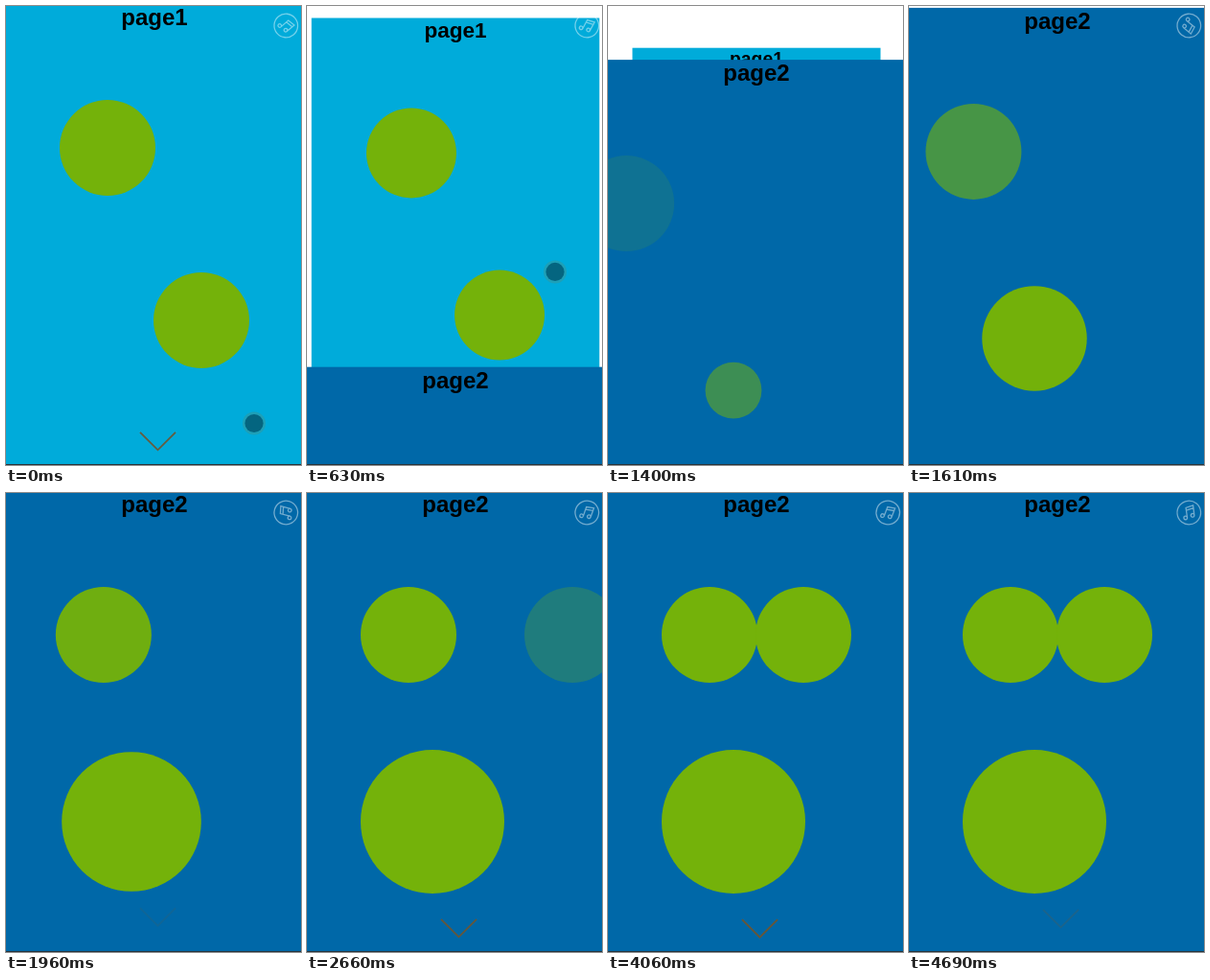
These frames come from a looping animation (308 by 479 pixels, 4760 ms). An HTML page with a canvas:

```html
<!DOCTYPE html>
<html lang="en">
<head>
<meta charset="utf-8">
<title>Page swipe</title>
<style>
  html, body { margin: 0; height: 100%; overflow: hidden; background: #fff; }
  canvas { display: block; }
</style>
</head>
<body>
<canvas id="stage" width="308" height="479"></canvas>
<script>
const ctx = document.getElementById('stage').getContext('2d');
const LOOP = 4760, STEP = 70;
const PAGE = { left: -5, top: -2, width: 320, height: 480, cx: 155, cy: 238 };
const GREEN = '#74b20a';
const DRAG_START = 100, RELEASE = 1100, SETTLE = 600, DRAG = 290;
const ENTER = 1290, ENTER_TIME = 900, ARROW_START = 1790, ARROW_TIME = 1330;
// [time, degrees] of the turning music button
const SPIN = [[0, 50], [910, 540], [1960, 1005], [2660, 1460], [3430, 1850], [4760, 2550]];

const clamp = x => Math.max(0, Math.min(1, x));
const mix = (a, b, k) => a + (b - a) * k;
const smooth = x => x * x * (3 - 2 * x);

// cubic-bezier(.25, .1, .25, 1)
function ease(x) {
  x = clamp(x);
  let lo = 0, hi = 1;
  const curve = (s, a, b) => 3 * (1 - s) ** 2 * s * a + 3 * (1 - s) * s * s * b + s ** 3;
  for (let i = 0; i < 20; i++) {
    const mid = (lo + hi) / 2;
    if (curve(mid, .25, .25) < x) lo = mid; else hi = mid;
  }
  return curve(lo, .1, 1);
}

function spinAt(t) {
  const i = SPIN.findIndex(([time]) => time > t);
  const [t0, a0] = SPIN[i - 1], [t1, a1] = SPIN[i];
  return mix(a0, a1, (t - t0) / (t1 - t0));
}

function disc(x, y, r, color = GREEN, alpha = 1) {
  ctx.globalAlpha = alpha;
  ctx.fillStyle = color;
  ctx.beginPath();
  ctx.arc(x, y, r, 0, 2 * Math.PI);
  ctx.fill();
  ctx.globalAlpha = 1;
}

function sheet(color, title) {
  ctx.fillStyle = color;
  ctx.fillRect(PAGE.left, PAGE.top, PAGE.width, PAGE.height);
  ctx.fillStyle = '#000';
  ctx.font = 'bold 24px "Liberation Sans", Arial, sans-serif';
  ctx.textAlign = 'center';
  ctx.fillText(title, PAGE.cx, 20);
}

function arrow(t) {
  const phase = (t - ARROW_START + ARROW_TIME * 2) % ARROW_TIME / ARROW_TIME;
  const k = ease(phase), y = 446 - 15 * (1 - k);
  ctx.globalAlpha = k;
  ctx.strokeStyle = '#6f5530';
  ctx.lineWidth = 1.8;
  ctx.beginPath();
  ctx.moveTo(140, y);
  ctx.lineTo(158.5, y + 18.5);
  ctx.lineTo(177, y);
  ctx.stroke();
  ctx.globalAlpha = 1;
}

function firstPage(t, scale) {
  ctx.save();
  ctx.translate(PAGE.cx, PAGE.cy);
  ctx.scale(scale, scale);
  ctx.translate(-PAGE.cx, -PAGE.cy);
  sheet('#00abda', 'page1');
  disc(106, 148, 50);
  disc(204, 328, 50);
  arrow(t);
  ctx.restore();
}

function secondPage(t, offset) {
  const x = (t - ENTER) / ENTER_TIME;
  const enter = ease(x), late = ease(x - 1200 / ENTER_TIME);
  ctx.save();
  ctx.translate(0, offset);
  sheet('#0068a8', 'page2');
  disc(106 - 100 * (1 - enter), 148, 50, GREEN, enter);
  disc(204 + 100 * (1 - late), 148, 50, GREEN, late);
  disc(131, 343, 75 * mix(.3, 1, enter), GREEN, ease(x / .4));
  if (t >= ARROW_START) arrow(t);
  ctx.restore();
}

function musicButton(t) {
  ctx.save();
  ctx.translate(292.3, 20.5);
  ctx.rotate(spinAt(t) * Math.PI / 180);
  ctx.strokeStyle = 'rgba(255,255,255,.45)';
  ctx.lineWidth = 1.3;
  ctx.beginPath();
  ctx.arc(0, 0, 12.3, 0, 2 * Math.PI);
  ctx.moveTo(-2.4, 5);
  ctx.arc(-4.2, 5, 1.8, 0, 2 * Math.PI);
  ctx.lineTo(-2.6, -5.4);
  ctx.lineTo(5.2, -7);
  ctx.lineTo(5.2, 3.2);
  ctx.arc(3.4, 3.2, 1.8, 0, 2 * Math.PI);
  ctx.moveTo(-2.6, -2.6);
  ctx.lineTo(5.2, -4.2);
  ctx.stroke();
  ctx.restore();
}

function draw(t) {
  const drag = DRAG * smooth(clamp((t - DRAG_START) / (RELEASE - DRAG_START)));
  const settle = ease((t - RELEASE) / SETTLE);
  const offset = (480 - drag * .641) * (1 - settle);
  const scale = mix(1 - .111 * drag / DRAG, .79, settle);

  ctx.fillStyle = '#fff';
  ctx.fillRect(0, 0, 308, 479);
  firstPage(t, scale);
  secondPage(t, offset);
  musicButton(t);
  if (t < RELEASE) {
    disc(259, 435.5 - drag, 12, '#3c9696', .5);
    disc(259, 435.5 - drag, 9.6, '#046580');
  }
  ctx.fillStyle = '#26343c';
  ctx.fillRect(0, 478, 308, 1);
}

function tick() {
  const t = performance.now() % LOOP;
  draw(t - t % STEP);
  requestAnimationFrame(tick);
}
tick();
</script>
</body>
</html>
```
